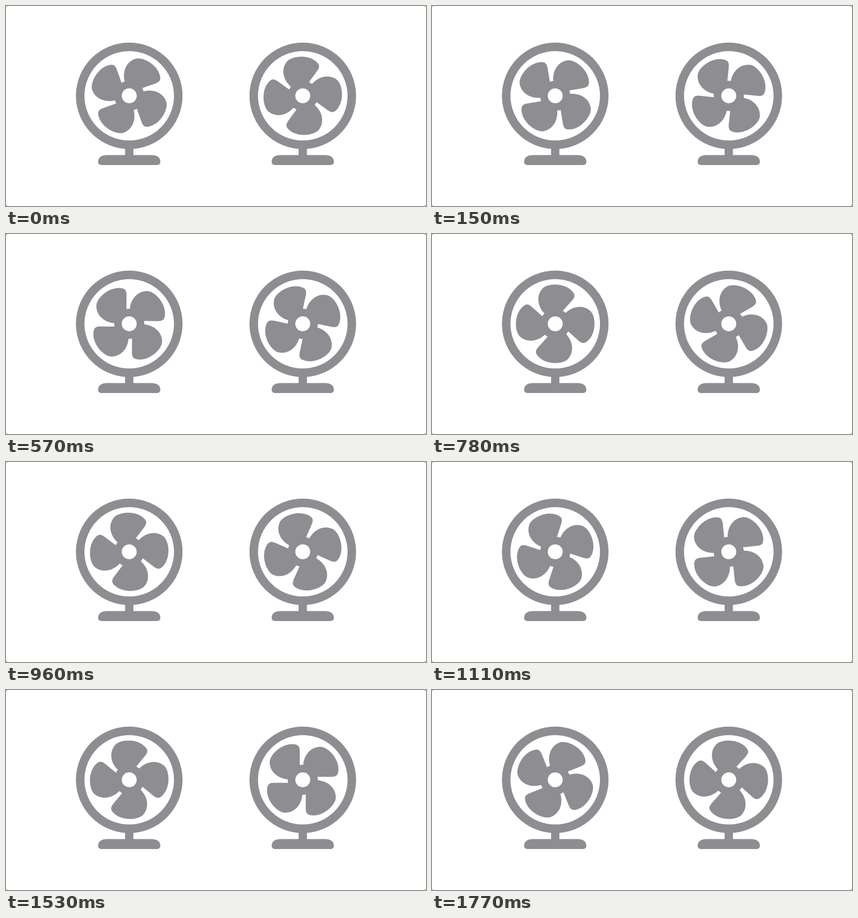
An HTML page with a canvas for the animation above (1800 ms loop, 788 px wide and 376 px high).

```html
<!DOCTYPE html>
<html lang="en">
<head>
<meta charset="utf-8">
<title>Two fans</title>
<style>
  html, body { margin: 0; width: 100%; height: 100%; overflow: hidden; background: #555; }
  canvas { display: block; width: 788px; height: 376px; }
</style>
</head>
<body>
<canvas id="stage" width="788" height="376"></canvas>
<script>
const ctx = document.getElementById('stage').getContext('2d');
const GREY = '#8e8d92', WHITE = '#fff';
const LOOP = 1800, STEP = 30;
const CY = 168.8;

const blade = new Path2D(`M0 0 L1 -28.2 C2 -45 14 -62 33 -62
  C47 -62 68 -40 67 -19 C66.6 -9.5 64 -5.8 54 -5.6 L28 -5.6 Z`);
const base = new Path2D(`M-42 111.4 H42 C52 111.4 58.4 116 58.4 124
  C58.4 128 56 130.2 52 130.2 H-52 C-56 130.2 -58.4 128 -58.4 124
  C-58.4 116 -52 111.4 -42 111.4 Z`);

function disc(r, color) {
  ctx.fillStyle = color;
  ctx.beginPath();
  ctx.arc(0, 0, r, 0, Math.PI * 2);
  ctx.fill();
}

// Cubic bezier easing with control points (x1, 0) and (x2, 1)
function ease(x, x1 = 0.3, x2 = 0.19) {
  let lo = 0, hi = 1;
  for (let i = 0; i < 24; i++) {
    const s = (lo + hi) / 2, q = 1 - s;
    if (3 * s * q * q * x1 + 3 * s * s * q * x2 + s * s * s < x) lo = s;
    else hi = s;
  }
  return lo * lo * (3 - 2 * lo);
}

function fan(cx, degrees) {
  ctx.save();
  ctx.translate(cx, CY);
  ctx.fillStyle = GREY;
  ctx.fillRect(-7.8, 96, 15.6, 18);
  ctx.fill(base);
  disc(100, GREY);
  disc(84, WHITE);
  ctx.rotate(degrees * Math.PI / 180);
  disc(28.3, GREY);
  for (let i = 0; i < 4; i++) {
    ctx.fill(blade);
    ctx.rotate(Math.PI / 2);
  }
  disc(14, WHITE);
  ctx.restore();
}

function draw(time) {
  const t = Math.floor((time % LOOP) / STEP) * STEP;
  ctx.clearRect(0, 0, 788, 376);
  ctx.fillStyle = WHITE;
  ctx.beginPath();
  ctx.roundRect(0, 0, 788, 376, 3);
  ctx.fill();

  const phase = ((t - 510 + LOOP) % LOOP) / LOOP;
  fan(231.2, 360 * ease(phase) - 1);
  fan(556.8, 36 - 360 * t / LOOP);
}

const start = performance.now();
function tick() {
  draw(performance.now() - start);
  requestAnimationFrame(tick);
}
tick();
</script>
</body>
</html>
```
